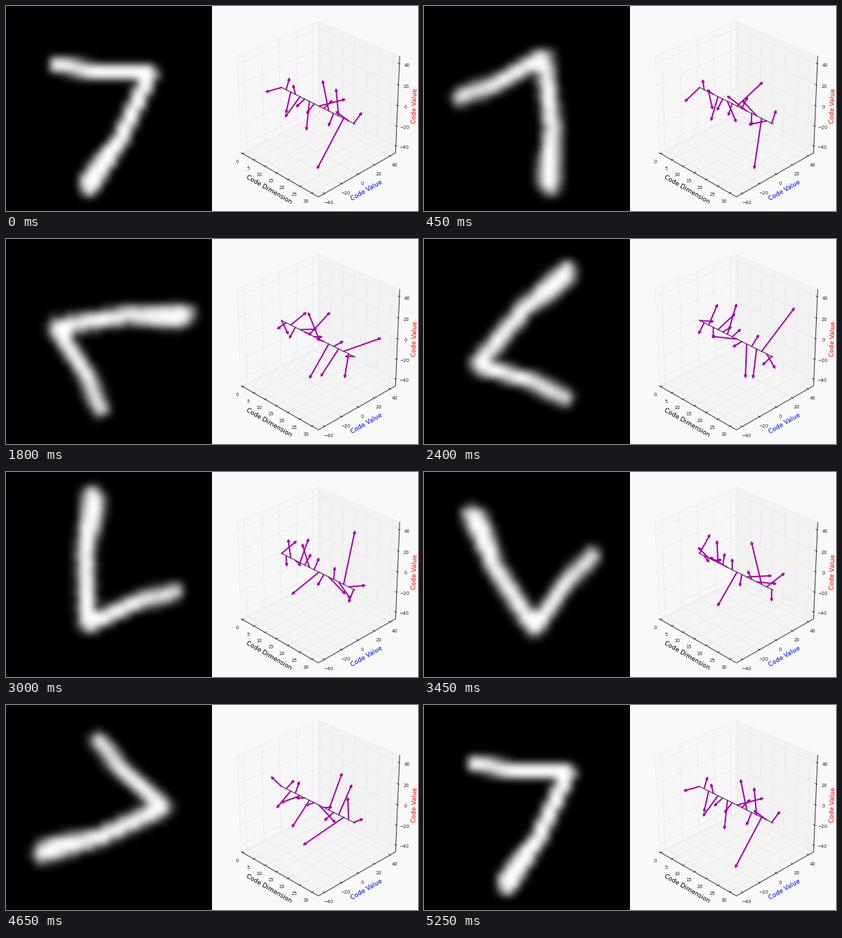
Write a matplotlib script that moves like this. It is 600 by 300 pixels and loops after 5400 ms.

```python
import numpy as np
import matplotlib.pyplot as plt
from matplotlib.animation import FuncAnimation
from matplotlib.patches import FancyArrowPatch

W, H, FRAMES, STEP = 600, 300, 36, 150
PT = 0.72  # points per pixel at 100 dpi
INK = "#222222"
plt.rcParams["font.family"] = "DejaVu Sans"

fig = plt.figure(figsize=(W / 100, H / 100), dpi=100, facecolor="#f9f9f9")
ax = fig.add_axes([0, 0, 1, 1])
ax.axis("off")

# ---- digit: a soft stroke sampled on a coarse grid ----
N = 28
CELL = H / N
STROKE = np.array([(74, 87), (140, 96), (210, 98), (166, 196), (126, 252), (122, 266)])


def make_digit():
    s = np.linspace(0, len(STROKE) - 1, 150)
    x, y = (np.interp(s, np.arange(len(STROKE)), c) for c in STROKE.T)
    radius = 11 + 4 * np.exp(-((s - 4) / 0.6) ** 2)  # swells at the foot
    level = 0.82 + 0.18 * np.minimum(1, s / 2)       # fades along the bar
    gy, gx = (np.mgrid[:N, :N] + 0.5) * CELL
    d = np.hypot(gx[..., None] - x, gy[..., None] - y)
    return (level / (1 + np.exp((d - radius) / 1.5))).max(axis=-1)


def rotate(img, a):
    """Counter-clockwise rotation with bilinear sampling."""
    mid = (N - 1) / 2
    v, u = np.mgrid[:N, :N] - mid
    x = np.clip(u * np.cos(a) - v * np.sin(a) + mid, 0, N - 1.001)
    y = np.clip(u * np.sin(a) + v * np.cos(a) + mid, 0, N - 1.001)
    i, j = y.astype(int), x.astype(int)
    fy, fx = y - i, x - j
    top = img[i, j] * (1 - fx) + img[i, j + 1] * fx
    low = img[i + 1, j] * (1 - fx) + img[i + 1, j + 1] * fx
    return top * (1 - fy) + low * fy


digit = make_digit()
picture = ax.imshow(digit, cmap="gray", vmin=0, vmax=1, aspect="auto",
                    interpolation="bicubic", extent=(0, H, H, 0))
ax.set_xlim(0, W)
ax.set_ylim(H, 0)

# ---- 3D box: perspective from elevation 30, azimuth -45 ----
EL, AZ = np.radians(30), np.radians(-45)
EYE = np.array([np.cos(EL) * np.cos(AZ), np.cos(EL) * np.sin(AZ), np.sin(EL)])
RIGHT = np.array([-np.sin(AZ), np.cos(AZ), 0])
UP = np.cross(EYE, RIGHT)
SCALE, CX, CY = 156.5, 455, 146.1
E = 0.5 + 1 / 48  # panes reach a little past the axis limits


def project(p):
    p = np.asarray(p, float)
    k = SCALE / (1 - p @ EYE / 10)
    return np.stack([CX + k * (p @ RIGHT), CY - k * (p @ UP)], axis=-1)


def nx(dim):
    return dim / 32 - 0.5


def nv(value):
    return value / 90


def path(points, color, width, z):
    ax.plot(*project(points).T, color=color, lw=width * PT, zorder=z)


def label(x, y, s, size, color=INK, angle=0):
    ax.text(x, y, s, fontsize=size * PT, color=color, rotation=angle,
            ha="center", va="center")


def tick(pos, inward, n, dx, dy):
    pos, inward = np.array(pos), np.array(inward)
    path([pos - inward / 120, pos + inward / 60], INK, 0.8, 4)
    x, y = project(pos)
    label(x + dx, y + dy, str(n).replace("-", "\u2212"), 6.8)


SQUARE = [(-E, -E), (-E, E), (E, E), (E, -E)]
for axis, (side, color) in enumerate([(-E, "#f7f7f7"), (E, "#f2f2f2"), (-E, "#f4f4f4")]):
    corners = np.insert(SQUARE, axis, side, axis=1)
    ax.fill(*project(corners).T, facecolor=color, edgecolor="#eeeeee",
            lw=0.9 * PT, zorder=1)

GRID = "#eaeaea"
for n in range(0, 31, 5):
    t = nx(n)
    path([(t, -E, -E), (t, E, -E), (t, E, E)], GRID, 0.9, 2)
    tick((t, -E, -E), (0, 1, 0), n, -8.3, 12.3)
for n in range(-40, 41, 20):
    t = nv(n)
    path([(E, t, -E), (-E, t, -E), (-E, t, E)], GRID, 0.9, 2)
    path([(-E, -E, t), (-E, E, t), (E, E, t)], GRID, 0.9, 2)
    tick((E, t, -E), (-1, 0, 0), n, 6, 13.5)
    tick((E, E, t), (-1, 0, 0), n, 11.5, 2.2)

path([(-E, -E, -E), (E, -E, -E), (E, E, -E), (E, E, E)], INK, 0.9, 3)
path([(nx(0), 0, 0), (nx(31), 0, 0)], "#444444", 1.2, 5)

label(383, 269, "Code Dimension", 9.1, "black", -30)
label(525, 269.5, "Code Value", 9.1, "blue", 30)
label(595.5, 146.5, "Code Value", 9.2, "red", 88)

# ---- code vectors: each pair turns at the same rate as the digit ----
START = np.radians([171, 67, 252, 104, 216, 200, 262, 213,
                    349, 20, 103, 238, 97, 229, 135, 34])
I = np.arange(len(START))
LENGTH = np.where(I % 2,
                  11.5 + 36 * np.exp(-(I - 13.0) ** 2),
                  19.5 + 15 * np.exp(-((I - 9) / 4) ** 2))
BASE_X = nx(2.03 * I)


def spokes(length, a):
    return project(np.stack([BASE_X, nv(length * np.cos(START + a)),
                             nv(length * np.sin(START + a))], axis=-1))


BASES = spokes(0, 0)
arrows = [ax.add_patch(FancyArrowPatch(b, b + 5, arrowstyle="-|>", mutation_scale=4.8,
                                       shrinkA=0, shrinkB=0, color="#aa00aa",
                                       lw=2 * PT, zorder=6))
          for b in BASES]


def draw(k):
    a = 2 * np.pi * k / (FRAMES - 1)
    picture.set_data(np.clip(1.3 * rotate(digit, a) - 0.07, 0, 1))
    for arrow, base, tip in zip(arrows, BASES, spokes(LENGTH, a)):
        arrow.set_positions(base, tip)
    return [picture, *arrows]


anim = FuncAnimation(fig, draw, frames=FRAMES, interval=STEP, repeat=True,
                     repeat_delay=0, blit=False)
plt.show()
```
